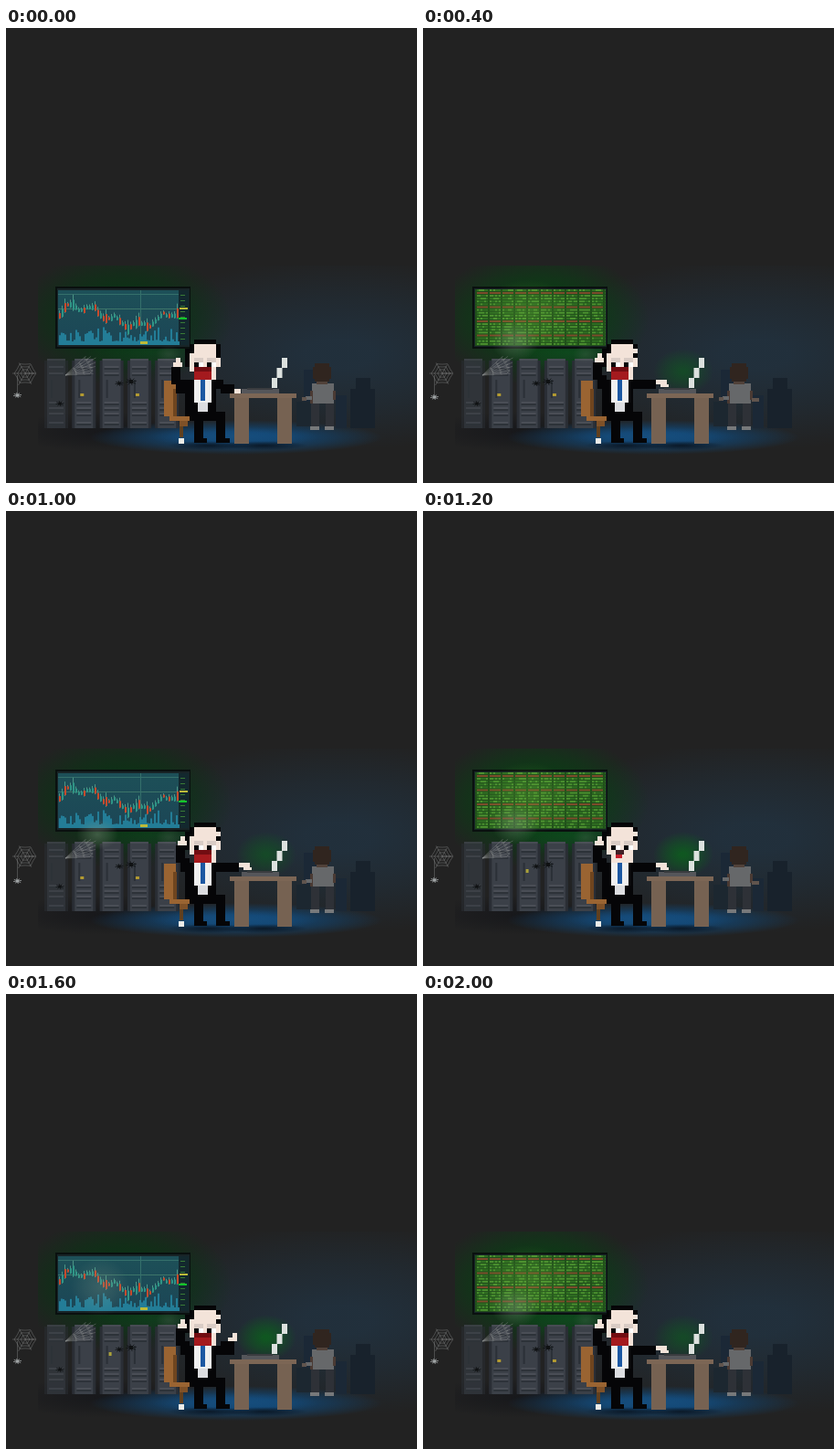
Write an HTML page with a canvas that moves like this. It is 450 by 498 pixels and loops after 2.2 s.

```html
<!DOCTYPE html>
<html lang="en">
<head>
<meta charset="utf-8">
<title>Server room</title>
<style>
  html, body { margin: 0; width: 100%; height: 100%; overflow: hidden; background: #222; }
  canvas { display: block; width: 450px; height: 498px; }
</style>
</head>
<body>
<canvas id="stage" width="450" height="498"></canvas>
<script>
const ctx = document.getElementById('stage').getContext('2d');
const STEP = 200, STEPS = 11, CELL = 4.93;

function box(color, x, y, w, h) {
  ctx.fillStyle = color;
  ctx.fillRect(x, y, w, h);
}

// Box on the coarse pixel grid of the man at the desk.
function cell(color, x, y, w = 1, h = 1) {
  const snapX = n => Math.round(181 + n * CELL);
  const snapY = n => Math.round(341 + n * CELL);
  box(color, snapX(x), snapY(y), snapX(x + w) - snapX(x), snapY(y + h) - snapY(y));
}

function glow(x, y, rx, ry, rgb, alpha, core = 0) {
  ctx.save();
  ctx.translate(x, y);
  ctx.scale(rx, ry);
  const g = ctx.createRadialGradient(0, 0, core, 0, 0, 1);
  g.addColorStop(0, `rgba(${rgb},${alpha})`);
  g.addColorStop(0.5, `rgba(${rgb},${alpha * 0.55})`);
  g.addColorStop(1, `rgba(${rgb},0)`);
  ctx.fillStyle = g;
  ctx.fillRect(-1, -1, 2, 2);
  ctx.restore();
}

function noise(n) {
  const v = Math.sin(n * 127.1 + 3.7) * 43758.5453;
  return v - Math.floor(v);
}

function room(green) {
  box('#222', 0, 0, 450, 498);
  ctx.save();
  ctx.beginPath();
  ctx.rect(35, 260, 415, 215);
  ctx.clip();
  glow(365, 357, 250, 105, '33,52,68', 0.75, 0.15);
  glow(128, 318, 120, 74, green ? '6,66,18' : '6,54,18', 0.85, 0.35);
  glow(160, 355, 75, 22, '12,84,30', green ? 0.6 : 0.35);
  glow(110, 442, 110, 22, '20,21,25', 0.8);
  ctx.restore();
  glow(252, 448, 160, 19, '17,70,116', 0.95, 0.3);
  glow(250, 447, 95, 11, '27,88,140', 0.5);
  glow(222, 457, 45, 5, '8,16,26', 0.8);
  glow(282, 457, 48, 5, '8,16,26', 0.8);
}

function chart() {
  const wall = ctx.createLinearGradient(57, 287, 57, 347);
  wall.addColorStop(0, '#1d5058');
  wall.addColorStop(1, '#1c4656');
  box(wall, 57, 287, 132, 60);
  box('#13282e', 189, 287, 11, 60);
  box('#35706b', 57, 291, 132, 1);
  box('#3d7569', 57, 307, 132, 1);
  box('#35706b', 147, 287, 1, 60);
  for (let x = 58; x < 189; x += 2) {
    const volume = 4 + 16 * noise(x) ** 2;
    box('#237d97', x, 347 - volume, 2, volume);
  }
  for (let x = 58; x < 188; x += 3) {
    const trend = 316 + 10 * Math.sin((x - 110) / 20) + 4 * Math.sin(x / 4);
    const y = Math.round(trend / 3) * 3, h = 3 + 9 * noise(x * 3) ** 2;
    box('#4c9585', x, y - h, 1, h * 1.6);
    box(noise(x * 7) > 0.62 ? '#c84a2c' : '#2f9586', x, y - h / 2, 2, h);
  }
  for (let y = 292; y < 345; y += 6) box('#397b36', 191, y, 5, 1);
  box('#bdbb39', 190, 306, 9, 2);
  box('#bdbb39', 147, 343, 8, 3);
  box('#12c52c', 189, 317, 9, 2);
}

function terminal() {
  box('#2a6a20', 57, 286, 143, 62);
  for (let row = 0; row < 20; row++) {
    const y = 286 + row * 3.1, red = row % 5 === 1;
    for (let x = 57; x < 199; x += 2) {
      const n = noise(x + row * 211), gap = (x - 57) % 14 === 0;
      box(gap ? '#1f4f1a' : red ? '#804a2c' : n > 0.5 ? '#4c9230' : '#2f6e22', x, y, 2, 2);
    }
    box('#214a1b', 57, y + 2, 143, 1);
  }
  glow(115, 315, 50, 40, '110,180,60', 0.25);
}

function screen(green) {
  box('#0a100f', 54, 283, 148, 68);
  box('#182427', 56, 285, 145, 64);
  green ? terminal() : chart();
}

function servers(ledsSide) {
  for (let i = 0; i < 5; i++) {
    const x = 45 + i * 30.3;
    ctx.globalAlpha = i ? 1 : 0.5;
    box('#2a2e35', x - 3, 364, 26, 74);
    box('#3b4048', x, 362, 20, 76);
    box('#484c54', x, 362, 20, 2);
    for (const y of [370, 377, 409, 415, 421, 431]) {
      box('#4a4e56', x + 2, y, 16, 2);
      box('#2d3239', x + 2, y + 2, 16, 2);
    }
    box('#2b3037', x + 4, 385, 2, 20);
    ctx.globalAlpha = 1;
    if (ledsSide && i % 2) box('#b39b31', x + 6, 400, 4, 3);
    if (!ledsSide && i === 2) box('#aaa13a', x + 7, 392, 3, 4);
  }
}

// Spokes from a hub between two angles, joined by sagging rings.
function web(x, y, radius, from, to) {
  const spokes = 6;
  const point = (i, r) => {
    const a = from + (to - from) * i / spokes;
    return [x + r * Math.cos(a), y + r * Math.sin(a)];
  };
  ctx.beginPath();
  for (let i = 0; i <= spokes; i++) {
    ctx.moveTo(x, y);
    ctx.lineTo(...point(i, radius * (0.75 + 0.4 * noise(i))));
  }
  for (let r = 0.35; r < 0.9; r += 0.25)
    for (let i = 0; i < spokes; i++) {
      ctx.moveTo(...point(i, radius * r));
      ctx.quadraticCurveTo(...point(i + 0.5, radius * r * 0.8), ...point(i + 1, radius * r));
    }
  ctx.stroke();
}

function spider(x, y, r, color) {
  box(color, x - r / 2, y - r / 2, r, r);
  ctx.strokeStyle = color;
  ctx.beginPath();
  for (let a = 0.6; a < 6.2; a += Math.PI / 4) {
    ctx.moveTo(x, y);
    ctx.lineTo(x + 1.5 * r * Math.cos(a), y + r * Math.sin(a));
  }
  ctx.stroke();
}

function cobwebs(drop) {
  ctx.lineWidth = 0.8;
  ctx.strokeStyle = 'rgba(140,143,143,.5)';
  web(21, 378, 14, 0, Math.PI * 2);
  web(65, 380, 36, -0.75, -0.05);
  box('rgba(140,143,143,.4)', 12, 380, 1, 20 + drop);
  spider(12.5, 402 + drop, 3, '#a0a4a5');
  spider(124, 389, 3, '#101214');
  spider(137, 387, 4, '#101214');
  spider(59, 411, 3, '#101214');
}

function smoke(step) {
  glow(178, 357, 14, 10, '130,150,130', 0.16);
  if (!step) return;
  const rise = (step - 1) % 4;
  glow(100 + rise, 354 - 11 * rise, 23 + 3 * rise, 17 + 5 * rise, '140,158,138', 0.38 - 0.04 * rise);
}

function coworker(reach) {
  const shirt = '#66686a';
  box('#1b2836', 326, 374, 14, 36);
  box('#1b2836', 361, 402, 12, 36);
  box('#1c2730', 318, 409, 17, 27);
  box('#18222c', 383, 383, 16, 13);
  box('#18222c', 377, 395, 27, 43);
  for (const x of [334, 350]) {
    box('#2e3137', x, 411, 9, 25);
    box('#77797b', x - 1, 436, 10, 4);
  }
  box(shirt, 335, 389, 24, 22);
  box('#4a3a33', 333, 397, 3, 14);
  box('#4a3a33', 358, 397, 3, 10);
  box('#30251f', 338, 367, 16, 20);
  box('#30251f', 336, 371, 20, 13);
  box('#51423a', 340, 387, 12, 3);
  box(shirt, 328, reach === 1 ? 401 : 403, 7, 4);
  if (reach !== 1) box('#60544d', 324, 404, 5, 4);
  if (reach) box('#60544d', 360, 405, 8, 4);
}

function chair() {
  box('#9a6432', 173, 386, 13, 39);
  box('#6f451f', 183, 395, 4, 30);
  box('#9a6432', 179, 425, 41, 5);
  box('#7f5128', 190, 430, 9, 6);
  box('#60401f', 190, 436, 4, 12);
  box('#ecece8', 189, 449, 6, 6);
}

function head(shout) {
  const black = '#050507', skin = '#f3e3d9';
  cell(black, 5, 0, 5);
  cell(black, 4, 1, 7, 2);
  cell(black, 3, 2, 2, 4);
  cell(black, 10, 2, 1, 3);
  cell(skin, 5, 1, 5, 8);
  cell(skin, 4, 3, 6, 4);
  cell(skin, 10, 4, 1, 2);
  for (const x of [5, 8]) {
    cell('#d9ccc5', x, 4, 2);
    cell(black, x, 5);
    cell('#fff', x + 1, 5);
  }
  if (shout) {
    cell('#720d12', 5, 6, 4);
    cell('#a41a1e', 5, 7, 4, 2);
  } else {
    cell('#402026', 6, 6, 2);
    cell('#c31e2b', 6, 7, 1.5);
  }
}

function arms(pose, suit, skin) {
  const greet = pose === 'greet', x = greet ? 0 : 1, y = greet ? 1 : 0;
  cell(skin, x + 0.5, 4 + y, 2);
  cell(skin, x + 1, 3 + y);
  cell(suit, x, 5 + y, 2, 4);
  cell(suit, x + 1, 8 + y, 2, 3);
  if (!greet) cell(skin, 10, 2);
  cell(suit, 10, 9, 1.5, 2);
  if (greet) {
    cell(suit, 11, 10, 3, 2);
    cell(skin, 14, 11, 1.5);
  } else if (pose === 'raise') {
    cell(suit, 11, 8, 3, 3);
    cell(skin, 12.5, 7, 2);
    cell(skin, 13.5, 6, 1.2, 2);
  } else {
    cell(suit, 10, 9, 5, 2);
    cell(skin, 15, 9, 2.5);
    cell(skin, 16, 10, 1.8, 0.6);
  }
}

function manager(pose, shout) {
  const suit = '#050507';
  cell(suit, 3, 9, 7, 8);
  cell(suit, 4, 16, 8, 2);
  for (const x of [5, 10]) {
    cell(suit, x, 18, 2, 4);
    cell(suit, x, 22, 3);
  }
  cell('#f0f0f0', 5, 9, 4, 5);
  cell('#dcdde0', 5.8, 14, 2.4, 2);
  cell('#1c58a2', 6.4, 9, 1.2, 4.5);
  head(shout);
  arms(pose, suit, '#f3e3d9');
}

function desk() {
  box('#55565a', 258, 395, 41, 5);
  box('#3a3c3f', 264, 394, 28, 2);
  for (let i = 0; i < 3; i++) box('#dce1de', 302 - i * 5.5, 361 + i * 11, 6, 11);
  box('#7c6655', 245, 400, 73, 5);
  for (const x of [250, 297]) box('#766252', x, 405, 16, 50);
}

function draw(step) {
  const beat = step % 5, green = step % 4 > 1, bright = beat === 1 || beat === 3;
  const pose = !step ? 'greet' : beat === 3 ? 'raise' : 'reach';
  room(green);
  screen(green);
  servers(!bright);
  cobwebs(Math.round(3 * Math.max(0, Math.sin(step * Math.PI / 8))));
  smoke(step);
  coworker(beat < 3 ? beat : 0);
  if (step) glow(285, 376, 33, 25, '10,100,26', bright ? 0.75 : 0.5, 0.1);
  chair();
  manager(pose, beat !== 1 && beat !== 4);
  desk();
}

let shown = -1;
function tick() {
  const step = Math.floor(performance.now() / STEP) % STEPS;
  if (step !== shown) draw(shown = step);
  requestAnimationFrame(tick);
}
tick();
</script>
</body>
</html>
```
